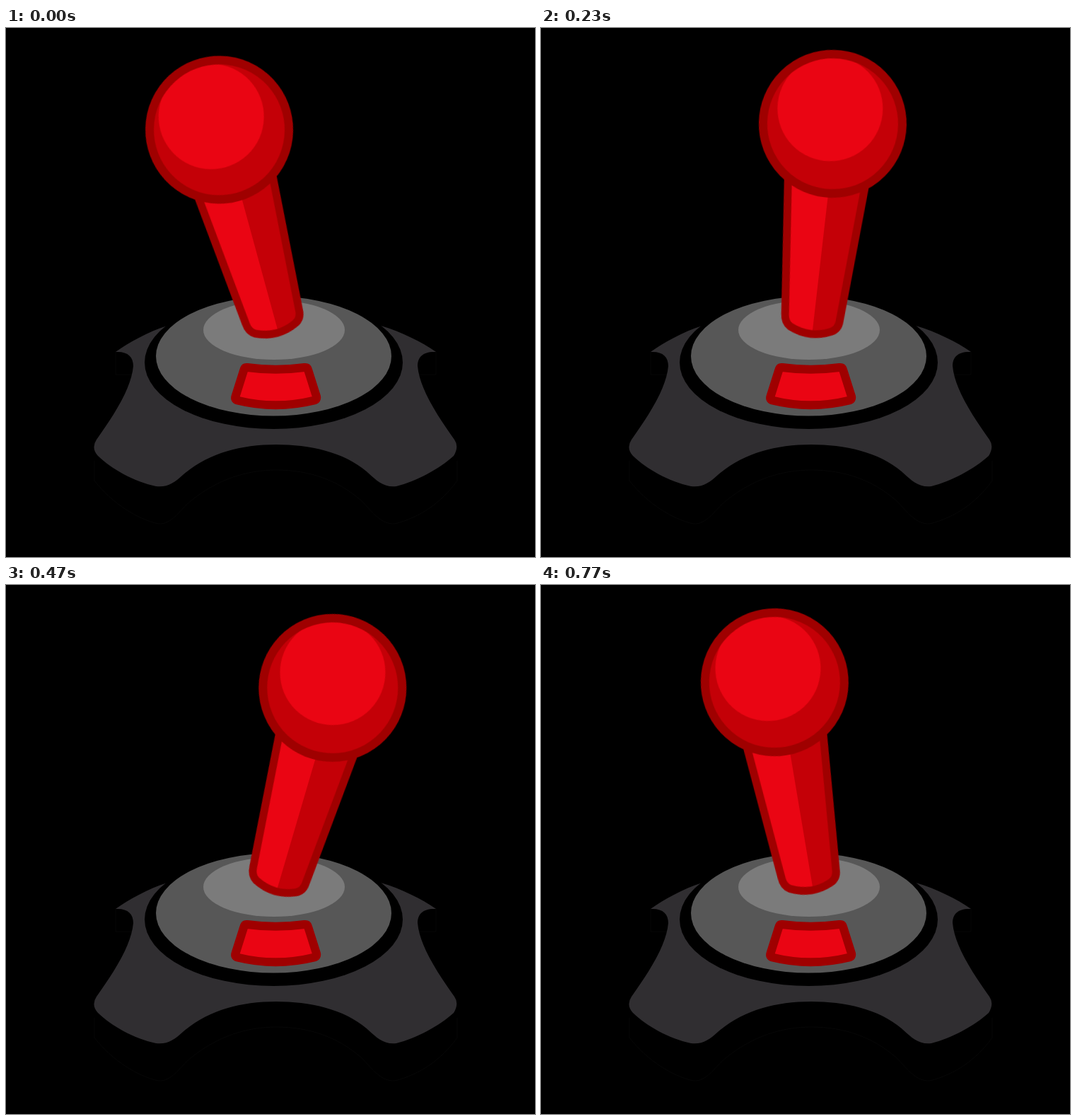
Animation of 748x748 px, one loop 0.81 s. Source, as an HTML page without scripts:

```html
<!DOCTYPE html>
<html lang="en">
<head>
<meta charset="utf-8">
<title>Joystick</title>
<style>
  html, body { margin: 0; width: 100%; height: 100%; overflow: hidden; background: #000; }
  svg { display: block; width: 100%; height: 100%; }

  .red { fill: #ea0513; }
  .shade { fill: #c40007; }
  .outline { fill: none; stroke: #9f0000; stroke-width: 12; stroke-linejoin: round; }
  .faint { fill: none; stroke: #070707; }

  /* 30 fps stepping; the last pose is held until the loop restarts */
  .stick, .button { animation: tilt 810ms -4ms infinite; }
  .stick { transform-origin: 379px 427px; }
  .button { transform-origin: 381.5px 507px; animation-name: press; }

  @keyframes tilt {
    0% { transform: rotate(-15.3deg); animation-timing-function: steps(12); }
    49.383% { transform: rotate(22.14deg); animation-timing-function: steps(11); }
    94.65%, 100% { transform: rotate(-9.54deg); }
  }
  @keyframes press {
    0% { transform: scale(1); }
    28.807% { transform: scale(1); animation-timing-function: steps(3); }
    41.152% { transform: scale(.795); animation-timing-function: steps(4); }
    57.613%, 100% { transform: scale(1); }
  }
</style>
</head>
<body>
<svg viewBox="0 0 748 748">
  <defs>
    <path id="shaft" d="M323.5 200 L342.8 408 Q343.5 420 352 425 Q381 439 410 426 Q420 421.5 420.5 410 L435.8 200Z"/>
    <path id="key" d="M341 480 Q381 485.5 422 480 Q426 479.5 427 483 L439 521 Q440 525.5 436 526.5 Q381 540 327 526.5 Q323 525.5 324.5 521 L336.5 483 Q337.5 479.5 341 480Z"/>
    <clipPath id="shaftClip"><use href="#shaft"/></clipPath>
    <clipPath id="ballClip"><circle cx="379" cy="133.5" r="98.5"/></clipPath>
  </defs>

  <rect width="748" height="748"/>

  <path class="faint" d="M155 458V490H180M608 458V490H583M125 612V640C150 672 185 694 215 701C235 702 243 684 262 668C300 638 340 625 382 625C430 625 470 640 502 668C520 686 530 702 550 701C585 692 615 672 638 640V612"/>

  <path fill="#302e31" d="M155 458C175 444 200 430 228 421H530C560 430 588 444 608 458
    C590 457 582 465 582 478C585 512 613 552 634 582Q641 592 633 605
    C612 624 580 641 552 648C535 650 525 641 512 629C480 600 430 589 382 589
    C330 589 285 602 250 632C238 643 228 650 212 648C180 641 150 624 130 605
    Q120 594 128 582C149 552 177 512 180 478C180 465 172 457 155 458Z"/>
  <ellipse cx="378.5" cy="473" rx="182.5" ry="94"/>
  <ellipse cx="378.5" cy="464" rx="166.5" ry="84.5" fill="#575757"/>
  <ellipse cx="379" cy="427" rx="100" ry="42" fill="#7b7b7b"/>

  <g class="button">
    <use href="#key" class="red"/>
    <use href="#key" class="outline"/>
  </g>

  <g class="stick">
    <use href="#shaft" class="red"/>
    <rect class="shade" x="384" y="190" width="70" height="255" clip-path="url(#shaftClip)"/>
    <use href="#shaft" class="outline" style="stroke-width:11"/>
    <circle class="shade" cx="379" cy="133.5" r="98.5"/>
    <circle class="red" cx="373" cy="112.5" r="74.5" clip-path="url(#ballClip)"/>
    <circle class="outline" cx="379" cy="133.5" r="98.5"/>
  </g>
</svg>
</body>
</html>
```
